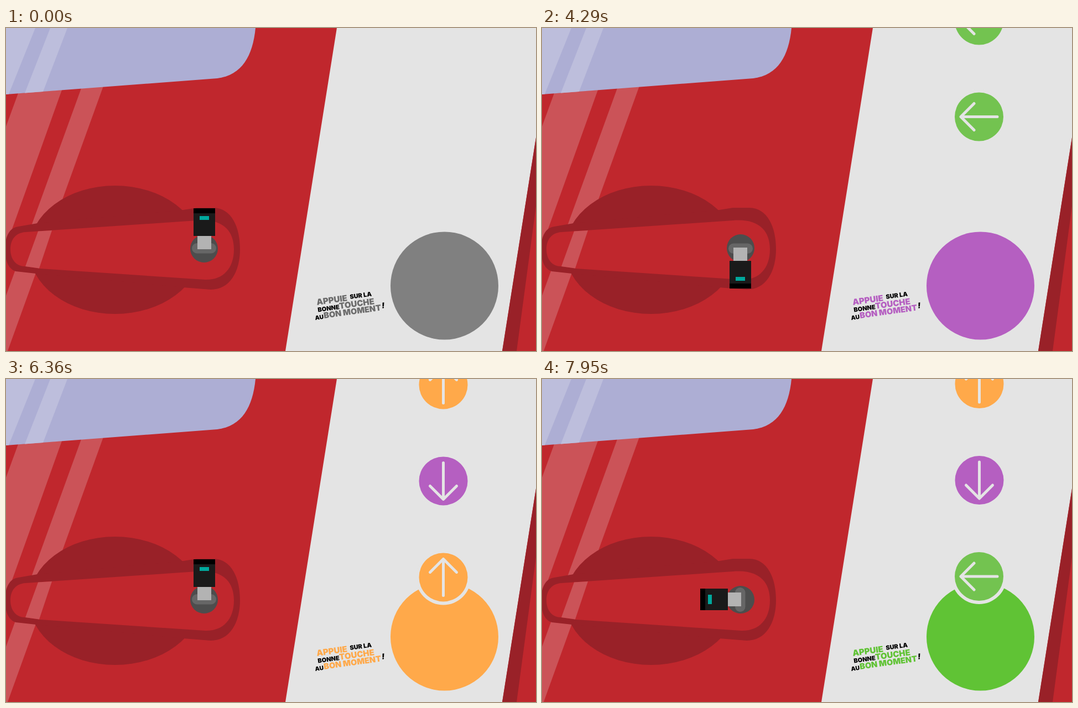
These frames come from a looping animation (958x584 px, 8000 ms). An HTML page:

```html
<!DOCTYPE html>
<html lang="fr">
<head>
<meta charset="utf-8">
<title>Appuie sur la bonne touche</title>
<style>
  html, body { margin: 0; width: 100%; height: 100%; overflow: hidden; background: #c0272d; }
  svg { display: block; width: 958px; height: 584px; }
  text { font-family: Inter, "Open Sans", sans-serif; font-weight: 900; }
  .arrow { fill: none; stroke: #e4e4e4; stroke-width: 5; stroke-linecap: round; stroke-linejoin: round; }
</style>
</head>
<body>
<svg viewBox="0 0 958 584">
  <rect width="958" height="584" fill="#c0272d"/>

  <!-- reflections and window -->
  <g fill="#cb5358">
    <path d="M22 118 101 112 13 358 0 394V178z"/>
    <path d="M136 109 176 105 3 584H0V484z"/>
  </g>
  <path d="M0 0H451C446 50 427 85 382 91L0 120z" fill="#adaed4"/>
  <path d="M0 0H53L5 119.600 0 120zM80 0H111L67 115 34 117.500z" fill="#bdbedc"/>

  <!-- handle -->
  <g fill="#992128">
    <ellipse cx="197" cy="401" rx="155" ry="116"/>
    <path d="M22 359 57 353 320 329 345 325H375C408 326 423 360 423 400S405 473 370 473L320 469 54 444 18 440C5 437-2 420-2 400S5 361 22 359z"/>
  </g>
  <path d="M35 369 345 348C390 344 412 365 412 400S392 456 360 455L62 435 35 431C18 431 8 418 8 400S18 370 35 369z" fill="#c0272d"/>
  <path d="M58 367.500 83 366 60 434.500 35 431z" fill="#cb5358"/>

  <!-- side panel -->
  <path d="M598 0H958V198L897 584H505z" fill="#e4e4e4"/>
  <path d="M958 198 897 584H923L958 322z" fill="#992128"/>

  <g id="key">
    <circle cx="358" cy="399" r="25" fill="#4d4d4d"/>
    <rect x="336" y="389" width="44" height="18.500" rx="9.200" fill="#666"/>
    <rect x="346" y="376" width="25" height="24" fill="#b3b3b3"/>
    <rect x="339" y="326" width="39" height="50" fill="#1a1a1a"/>
    <rect x="339" y="326" width="39" height="9" fill="#000"/>
    <rect x="350" y="340" width="17" height="7" fill="#00a99d"/>
  </g>

  <g id="big" font-size="15">
    <text transform="translate(562 501) rotate(-8)">APPUIE</text>
    <text transform="translate(603 508) rotate(-8)">TOUCHE</text>
    <text transform="translate(575 525) rotate(-8)" font-size="14.600">BON MOMENT</text>
  </g>
  <g font-size="11">
    <text transform="translate(622 490) rotate(-8)">SUR LA</text>
    <text transform="translate(564 513.500) rotate(-8)">BONNE</text>
    <text transform="translate(559 528) rotate(-8)" font-size="10.500">AU</text>
    <text transform="translate(679 507) rotate(-8) skewX(-10)" font-size="14">!</text>
  </g>

  <circle id="button" cx="792.5" cy="466" r="97.500"/>
  <g id="lane"></g>
</svg>

<script>
const LOOP = 8000, GAP = 174, HIT_Y = 365, END_Y = 545, SHRINK = 160;
const KINDS = {
  up:   { turn: 0,   ball: '#ffa94a', button: '#ffa94a' },
  down: { turn: 180, ball: '#b55fc1', button: '#b55fc1' },
  left: { turn: -90, ball: '#73c350', button: '#60c335' }
};
// [ms, lane scroll]
const SCROLL = [[0, -615], [1260, -615], [1290, -600], [2070, -265], [2400, -122], [3810, -55], [3840, -42],
  [4290, 160], [4620, 318], [5400, 653], [6360, 1054], [7020, 1348], [7950, 1749], [LOOP, 1749]];

const $ = id => document.getElementById(id);

// Piecewise linear lookup from column a to column b
function lookup(v, a, b) {
  let i = 1;
  while (i < SCROLL.length - 1 && SCROLL[i][a] < v) i++;
  const p = SCROLL[i - 1], q = SCROLL[i];
  return p[b] + (q[b] - p[b]) * (v - p[a]) / (q[a] - p[a] || 1);
}

function addBall(kind, offset, x) {
  const { turn, ball } = KINDS[kind];
  const el = document.createElementNS('http://www.w3.org/2000/svg', 'g');
  el.innerHTML = `<circle r="50" fill="#e4e4e4"/><circle r="44" fill="${ball}"/>
    <path class="arrow" transform="rotate(${turn})" d="M0 33V-32M-24-9 0-33 24-9"/>`;
  $('lane').prepend(el);
  const end = HIT_Y - offset;
  const hit = end < SCROLL[SCROLL.length - 1][1] ? lookup(end, 1, 0) : Infinity;
  return { kind, offset, x, el, hit };
}

const order = 'left left up up up down up left left down up'.split(' ');
const balls = [addBall('down', 558, 793),
  ...order.map((kind, i) => addBall(kind, -GAP * i, kind === 'left' ? 790 : 790.5))];

function draw(now) {
  const t = now % LOOP, scroll = lookup(t, 0, 1);
  let turn = 0, color = '#808080', ink = '#6b6b6b';
  for (const b of balls) {
    const k = Math.max(0, (t - b.hit) / SHRINK);
    const y = k ? HIT_Y + (END_Y - HIT_Y) * k : scroll + b.offset;
    const shown = k < 1 && y > -50;
    b.el.setAttribute('display', shown ? 'inline' : 'none');
    if (shown) b.el.setAttribute('transform', `translate(${b.x} ${y}) scale(${1 - k})`);
    if (t >= b.hit) {
      turn = KINDS[b.kind].turn;
      color = ink = KINDS[b.kind].button;
    }
  }
  $('key').setAttribute('transform', `rotate(${turn} 358.5 398.5)`);
  $('button').setAttribute('fill', color);
  $('big').setAttribute('fill', ink);
}

function tick(now) {
  draw(now);
  requestAnimationFrame(tick);
}
draw(0);
requestAnimationFrame(tick);
</script>
</body>
</html>
```
